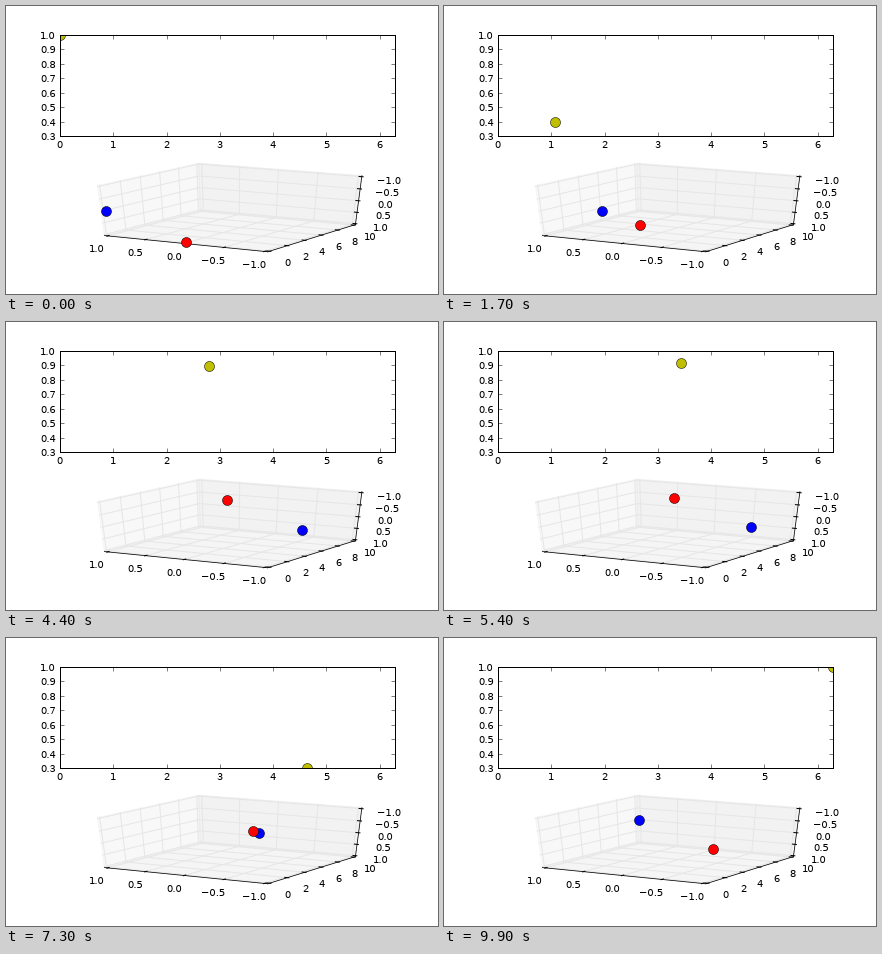
Animation, 432 px wide and 288 px high, one loop 10 s. Source, as a matplotlib script:

```python
import numpy as np
import matplotlib.pyplot as plt
from matplotlib.animation import FuncAnimation

plt.rcParams.update({
    "font.family": "DejaVu Sans",
    "font.size": 10,
    "text.hinting": "native",
    "text.hinting_factor": 8,
})

W, H, DPI = 432, 288, 72
N = 100
EDGE = 0.5 + 1 / 48          # half size of the box, unit cube plus margin
PAD = EDGE + 0.11            # where tick labels sit
AZIM, ELEV, DIST = np.radians(60), np.radians(30), 10

fig = plt.figure(figsize=(W / DPI, H / DPI), dpi=DPI, facecolor="white")
fig.subplots_adjust(left=0.125, right=0.9, bottom=0.125, top=0.9, hspace=0.2)

# Upper chart
top = fig.add_subplot(211)
top.set_xlim(0, 2 * np.pi)
top.set_ylim(0.3, 1.0)
top.set_xticks(range(7))
top.set_yticks(np.arange(0.3, 1.01, 0.1))
top.tick_params(direction="in", length=4, width=0.5, pad=4, top=True, right=True)
for spine in top.spines.values():
    spine.set_linewidth(1)

# Lower scene, drawn in pixel coordinates
scene = fig.add_axes([0, 0, 1, 1])
scene.set_xlim(0, W)
scene.set_ylim(H, 0)
scene.axis("off")

VIEW_W, VIEW_H = 0.775 * W, 0.775 / 2.2 * H
SX, SY = VIEW_W / 0.185, VIEW_H / 0.185
CX, CY = 0.125 * W + 0.095 * SX, 0.875 * H - 0.095 * SY

a, b = np.sin(AZIM), np.cos(AZIM)
s, c = np.sin(ELEV), np.cos(ELEV)
RIGHT = np.array([-a, b, 0])
UP = np.array([b * s, a * s, -c])
TOWARD = np.array([-b * c, -a * c, -s])


def project(p):
    """Perspective view of a point in the centred unit cube, in pixels."""
    p = np.asarray(p, float)
    depth = DIST - p @ TOWARD
    return CX + SX * (p @ RIGHT) / depth, CY - SY * (p @ UP) / depth


def stroke(points, **style):
    scene.plot(*project(points), **style)


def pane(axis, shade):
    corners = []
    for i, j in ((-1, -1), (1, -1), (1, 1), (-1, 1)):
        p = [i * EDGE, j * EDGE]
        p.insert(axis, EDGE)
        corners.append(p)
    xs, ys = project(corners)
    scene.fill(xs, ys, fc=(shade,) * 3, ec=(shade,) * 3, alpha=0.5, lw=1)


for axis, shade in enumerate((0.95, 0.90, 0.925)):
    pane(axis, shade)

halves = np.linspace(-0.5, 0.5, 5)
half_text = ["−1.0", "−0.5", "0.0", "0.5", "1.0"]
tenths = np.linspace(-0.5, 0.5, 6)
tenth_text = [str(n) for n in range(0, 11, 2)]

# Axis, ticks, labels, front edge, direction the ticks point along
AXES = [
    (0, halves, half_text, (0, -1, 1), 1),
    (1, tenths, tenth_text, (-1, 0, 1), 0),
    (2, halves, half_text, (-1, 1, 0), 0),
]


def on_edge(axis, side, loc, size=EDGE):
    p = np.array(side) * size
    p[axis] = loc
    return p


# Grid lines run along the two panes that meet each axis
for axis, locs, _, side, _ in AXES:
    for loc in locs:
        start = on_edge(axis, side, loc)
        mid = np.full(3, EDGE)
        mid[axis] = loc
        end = mid.copy()
        far = next(k for k in range(3) if k != axis and side[k] == 1)
        end[far] = -EDGE
        stroke([start, mid, end], color=(0.9,) * 3, lw=1)

for axis, locs, names, side, along in AXES:
    stroke([on_edge(axis, side, -EDGE), on_edge(axis, side, EDGE)],
           color="black", lw=0.75)
    for loc, name in zip(locs, names):
        outer, inner = on_edge(axis, side, loc), on_edge(axis, side, loc)
        outer[along] += side[along] * 0.1 / 12
        inner[along] -= side[along] * 0.2 / 12
        stroke([outer, inner], color="black", lw=1)
        x, y = project(on_edge(axis, side, loc, PAD))
        scene.text(x, y, name, ha="center", va="top")


def ball(ax, color):
    return ax.plot([], [], "o", ms=10, mfc=color, mec="black", mew=0.5)[0]


yellow = ball(top, (0.75, 0.75, 0))
blue = ball(scene, (0, 0, 1))
red = ball(scene, (1, 0, 0))


def level(t):
    q = np.cos(t + 0.012) ** 2
    return 0.3 + 0.4 * q + 0.3 * q * q


def place(dot, x, y):
    dot.set_data([x], [y])


def update(i):
    u = i / (N - 1)
    t = 2 * np.pi * u
    swing = np.cos(t) / 2
    place(yellow, t, level(t))
    place(blue, *project((swing, u - 0.5, 0)))
    place(red, *project((0, u - 0.5, swing)))
    return yellow, blue, red


anim = FuncAnimation(fig, update, frames=N, interval=100, repeat=True,
                     repeat_delay=0, blit=False)
plt.show()
```
